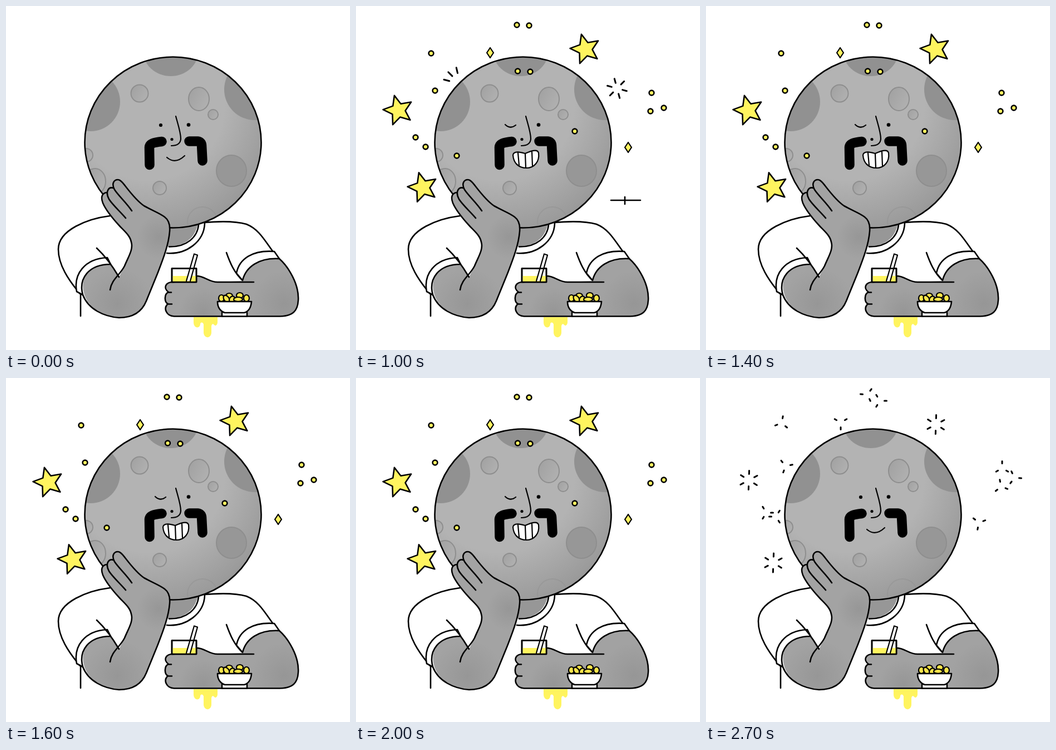
An HTML page for the animation above (2.8 s loop, 618x618 px).

```html
<!DOCTYPE html>
<html lang="en">
<head>
<meta charset="utf-8">
<title>Winking moon</title>
<style>
  html, body { margin: 0; height: 100%; overflow: hidden; background: #fff; }
  svg { display: block; width: 100vw; height: 100vh; }
  .ink { fill: none; stroke: #000; stroke-width: 2.6; stroke-linecap: round; stroke-linejoin: round; }
  .thin { stroke-width: 2.2; }
  .white { fill: #fff; }
  .yellow { fill: #fff45f; }
  .crater { fill: url(#dent); stroke: #8e8e8e; stroke-width: 2; }
  .tash { stroke-width: 17.5; }
  .rays { stroke-width: 3; }
</style>
</head>
<body>
<svg viewBox="0 0 618 618">
  <defs>
    <radialGradient id="moonFill" gradientUnits="userSpaceOnUse" cx="255" cy="175" r="250">
      <stop offset=".55" stop-color="#b3b3b3"/><stop offset="1" stop-color="#969696"/>
    </radialGradient>
    <linearGradient id="dent" x1="0" y1="0" x2="1" y2=".6">
      <stop offset="0" stop-color="#a0a0a0"/><stop offset="1" stop-color="#b0b0b0"/>
    </linearGradient>
    <radialGradient id="shade">
      <stop offset="0" stop-color="#848484" stop-opacity=".4"/><stop offset="1" stop-color="#848484" stop-opacity="0"/>
    </radialGradient>
    <clipPath id="moonClip"><ellipse cx="300" cy="245" rx="159" ry="153.5"/></clipPath>
    <path id="leftArm" d="M188 464L203 487L213 467C220 450 229 437 225 424C223 412 211 403 203 394C192 382 180 368 174 354C170 344 172 336 181 335C181 327 188 325 193 327C189 318 194 312 201 312C206 312 210 318 214 323C224 336 236 351 248 359C262 367 276 372 285 379C293 385 295 394 294 405C292 430 282 455 272 481L252 530C243 552 224 560 203 560C176 558 152 545 142 522C130 490 148 464 188 464Z"/>
    <path id="rightArm" d="M302 496H342V485C357 485 364 496 380 496L425 494C430 468 455 452 491 454C507 468 527 500 525 529C524 548 515 557 492 557.5H302C288 557 282 543 291 535C284 532 284 517 292 514C282 507 286 495 302 496Z"/>
    <clipPath id="leftClip"><use href="#leftArm"/></clipPath>
    <clipPath id="rightClip"><use href="#rightArm"/></clipPath>
  </defs>

  <path fill="#979797" d="M285 380H346C345 412 325 434 285 432Z"/>
  <g class="ink">
    <path d="M187 377C147 382 94 402 94 437C94 465 112 492 133 517M134 516V557"/>
    <path d="M355 389C390 386 415 387 432 392C457 402 467 426 487 451"/>
    <path d="M293 432.500C325 433 344 415 346 393M289 444C323 447 356 424 357 390"/>
    <path d="M396 443C402 460 410 480 426 494"/>
  </g>

  <g clip-path="url(#moonClip)">
    <rect x="140" y="90" width="320" height="310" fill="url(#moonFill)"/>
    <g fill="#919191">
      <ellipse cx="296" cy="80" rx="50" ry="46"/>
      <circle cx="152" cy="172" r="53"/>
      <circle cx="447" cy="150" r="55"/>
    </g>
    <g class="crater">
      <circle cx="240" cy="157" r="15.500"/>
      <ellipse cx="346.500" cy="167" rx="18.500" ry="21"/>
      <circle cx="372" cy="195" r="9"/>
      <circle cx="276" cy="327" r="12"/>
      <circle cx="144" cy="268" r="12"/>
      <ellipse cx="160" cy="315" rx="19" ry="23"/>
      <ellipse cx="405" cy="296" rx="27" ry="28" style="fill:#979797"/>
      <circle cx="353" cy="388" r="27" style="fill:none" opacity=".45"/>
    </g>
  </g>
  <ellipse class="ink" cx="300" cy="245" rx="158.500" ry="153.500"/>

  <g class="ink thin">
    <path d="M305 198C309 213 314 227 314 239C313 249 305 251 297 251"/>
    <path class="tash" d="M280 243.500C265 245 258 247 257.500 254L258 285.500"/>
    <path class="tash" d="M329 243H344Q351 244 351.500 250L353 278"/>
  </g>
  <circle cx="298" cy="239.500" r="2.600"/>
  <circle cx="328" cy="213.500" r="3.300"/>
  <g id="calm">
    <circle cx="278" cy="214" r="3.100"/>
    <path class="ink thin" d="M289 272Q304 285 321 269"/>
  </g>
  <g id="grin" class="ink thin">
    <path d="M268 213Q277 222 287 214"/>
    <path class="white" d="M282 268C283 259 297 263 304 265C311 262 326 255 328 264C330 280 320 291 306 291C291 291 283 281 282 268Z"/>
    <path d="M291 264L293 286M304 266L305 290M316 262L317 287"/>
  </g>

  <use href="#leftArm" fill="#a3a3a3"/>
  <g clip-path="url(#leftClip)" fill="url(#shade)">
    <circle cx="275" cy="415" r="40"/>
    <circle cx="200" cy="535" r="65"/>
  </g>
  <g class="ink">
    <path class="white" d="M127 513C121 482 141 454 182 452L188 464C148 464 130 490 138 519Z"/>
    <path d="M163 435C178 449 193 470 203 487M138 519C148 545 176 558 203 560C224 560 243 552 252 530L272 481C282 455 292 430 294 405C295 394 293 385 285 379C276 372 262 367 248 359C236 351 224 336 214 323C210 318 206 312 201 312C194 312 189 319 195 330C203 342 216 353 226 368"/>
    <path d="M193 327C184 324 178 334 185 347C192 358 205 369 215 381M181 335C172 336 170 344 174 354C180 368 192 382 203 394C211 403 223 412 225 424C229 437 220 450 213 467C205 483 189 492 187 510"/>
  </g>

  <use href="#rightArm" fill="#a2a2a2"/>
  <g clip-path="url(#rightClip)" fill="url(#shade)">
    <circle cx="500" cy="535" r="60"/>
    <circle cx="355" cy="550" r="45"/>
  </g>
  <g class="ink">
    <path class="white" d="M414 480C419 454 443 438 482 441L491 454C455 452 431 468 425 493Z"/>
    <path d="M491 454C507 468 527 500 525 529C524 548 515 557 492 557.500H302C288 557 282 543 291 535C284 532 284 517 292 514C282 507 286 495 302 496M291 514.500H297M290 535.500H298M342 485C357 485 364 496 380 496H445"/>
    <path class="white" d="M298 471.500H342V496H298Z"/>
  </g>
  <path class="yellow" d="M299.500 485H341V495H299.500Z"/>
  <path class="ink thin white" d="M324 494L338 445.500L344 447.500L331 494"/>
  <path class="ink" d="M298 471.500H342V496H298Z"/>

  <g class="ink thin" style="fill:#fbe64b">
    <ellipse cx="401" cy="521" rx="6" ry="5"/>
    <ellipse cx="420" cy="520" rx="6" ry="5"/>
    <ellipse cx="387" cy="525" rx="5" ry="6"/>
    <ellipse cx="396" cy="526" rx="4.500" ry="7" transform="rotate(-35 396 526)"/>
    <ellipse cx="406" cy="527" rx="4.500" ry="6" transform="rotate(30 406 527)"/>
    <ellipse cx="417" cy="527" rx="8" ry="4"/>
    <ellipse cx="432" cy="525" rx="5" ry="6"/>
  </g>
  <g class="ink white">
    <path d="M388 550H433V557.500H388Z"/>
    <path d="M380 531H441C440 543 435 549 428 551H393C385 548 380 542 380 531Z"/>
  </g>
  <path class="yellow" d="M337 559V568C337 580 349 580 349 571C350 567 354 568 355 572V587C356 598 369 598 369 586V575C370 570 373 571 374 573C377 576 380 572 380 568V559Z"/>

  <g id="sparks" class="ink"></g>
</svg>

<script>
const $ = id => document.getElementById(id);

// kind, x, y, first bob direction (1 = down), burst rotation (omitted: no burst)
const items = [
  ['star', 412, 77.5, -1, -28], ['star', 76, 187.5, 1, -28], ['star', 120, 326, -1, -28],
  ['gem', 241, 84, 1, 90], ['gem', 489, 254, -1, 100],
  ['dot', 289, 34, 1, 65], ['dot', 311, 35, -1, 0], ['dot', 135, 85, 1, 40],
  ['dot', 142, 152, -1, -10], ['dot', 107, 236, -1, 0], ['dot', 125, 253, 1, 60],
  ['dot', 531, 156, -1, 30], ['dot', 529, 189, -1, 20], ['dot', 553, 183, 1, 5],
  ['dot', 181, 269, -1], ['dot', 290.5, 117, 1], ['dot', 313, 118, -1], ['dot', 393, 225, 1]
];

const polar = (x, y, r, deg) => {
  const a = deg * Math.PI / 180;
  return `${(x + r * Math.cos(a)).toFixed(1)} ${(y + r * Math.sin(a)).toFixed(1)}`;
};
const rays = (x, y, from, to, angles) => '<path class="rays" d="' +
  angles.map(a => `M${polar(x, y, from, a)}L${polar(x, y, to, a)}`).join('') + '"/>';
const spread = (count, turn) => Array.from({ length: count }, (_, i) => turn + i * 360 / count);

const shapes = {
  star: (x, y) => `<path class="yellow" d="M${spread(10, -105).map((a, i) => polar(x, y, i % 2 ? 12.5 : 27.5, a)).join('L')}Z"/>`,
  gem: (x, y) => `<path class="yellow thin" d="M${x} ${y - 9}L${x + 6} ${y}L${x} ${y + 9}L${x - 6} ${y}Z"/>`,
  dot: (x, y) => `<circle class="yellow" cx="${x}" cy="${y}" r="4.4"/>`
};

const floating = step => {
  const bob = 5 * Math.round(Math.sin((step - 10) * Math.PI / 2));
  return items.map(([kind, x, y, dir]) => shapes[kind](x, y + dir * bob)).join('');
};

const bursts = wide => items.filter(item => item.length > 4).map(([kind, x, y, dir, turn]) => {
  const big = kind === 'star';
  const [from, to] = big ? (wide ? [11, 17] : [4.5, 12]) : (wide ? [8.5, 12.5] : [3, 8.5]);
  return rays(x + 1, y - dir * 5 + 1, from, to, spread(big ? 6 : 3, turn));
}).join('');

const flashes = size =>
  rays(187, 140, 30 - 10 * size, 30, [195, 225, 257]) +
  rays(469, 148, 10 * size, 18 * size, spread(6, -45)) +
  `<path d="M${484 - 26 * size} 349H${484 + 27 * size}M483 ${349 - 6 * size}V${349 + 7 * size}"/>`;

const winkRays = length => rays(275, 215, 14, 14 + length, [195, 222, 245]);

function draw(step) {
  const grinning = step >= 5 && step < 27;
  $('calm').style.display = grinning ? 'none' : '';
  $('grin').style.display = grinning ? '' : 'none';
  let art = '';
  if (step === 6) art += winkRays(5);
  if (step === 7) art += winkRays(10);
  if (step === 7 || step === 26) art += bursts(false);
  if (step === 8 || step === 27) art += bursts(true);
  if (step >= 9 && step < 26) art += floating(step);
  if (step === 9) art += flashes(0.6);
  if (step === 10) art += flashes(1);
  $('sparks').innerHTML = art;
}

let shown = -1;
const start = performance.now();
function tick() {
  const step = Math.floor((performance.now() - start) % 2800 / 100);
  if (step !== shown) draw(shown = step);
  requestAnimationFrame(tick);
}
tick();
</script>
</body>
</html>
```
